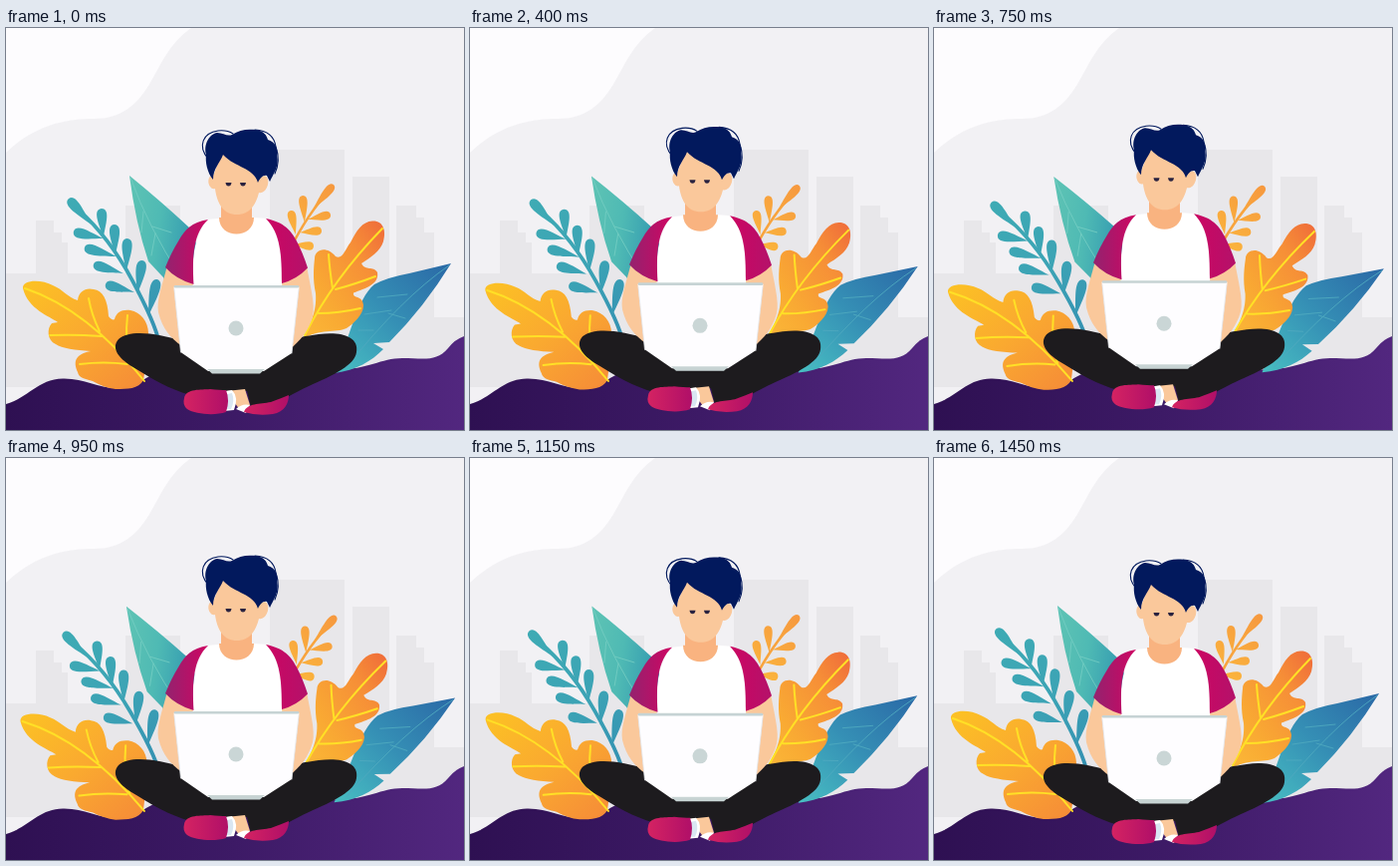
An HTML page that plays this animation: 460 px wide and 403 px high, repeating every 1500 ms.

```html
<!DOCTYPE html>
<html lang="en">
<head>
<meta charset="utf-8">
<title>Working outdoors</title>
<style>
  html, body { margin: 0; width: 100%; height: 100%; overflow: hidden; background: #f2f1f4; }
  svg { display: block; width: 100vw; height: 100vh; }
  .line { fill: none; stroke-linecap: round; }
</style>
</head>
<body>
<svg viewBox="0 0 460 403" preserveAspectRatio="none">
  <defs>
    <linearGradient id="hill">
      <stop offset="0" stop-color="#2e1052"/><stop offset=".5" stop-color="#3d1a66"/><stop offset="1" stop-color="#52277f"/>
    </linearGradient>
    <linearGradient id="gold" x1="0" y1="0" x2="1" y2="1">
      <stop offset="0" stop-color="#fcc224"/><stop offset=".5" stop-color="#faa930"/><stop offset="1" stop-color="#f58a38"/>
    </linearGradient>
    <linearGradient id="amber" x1="1" y1="0" x2="0" y2="1">
      <stop offset="0" stop-color="#ef6a3a"/><stop offset=".3" stop-color="#f68f37"/><stop offset=".7" stop-color="#f9aa33"/><stop offset="1" stop-color="#fbb838"/>
    </linearGradient>
    <linearGradient id="teal" x1="0" y1=".3" x2="1" y2=".6">
      <stop offset="0" stop-color="#5cc2b4"/><stop offset=".4" stop-color="#4fbab4"/><stop offset="1" stop-color="#2d93b0"/>
    </linearGradient>
    <linearGradient id="blue" x1="1" y1="0" x2="0" y2="1">
      <stop offset="0" stop-color="#2a68a6"/><stop offset=".5" stop-color="#358fb5"/><stop offset="1" stop-color="#48bfc2"/>
    </linearGradient>
    <linearGradient id="sprig" x1="60" y1="170" x2="155" y2="310" gradientUnits="userSpaceOnUse">
      <stop offset="0" stop-color="#3eabb4"/><stop offset=".55" stop-color="#3ca3b5"/><stop offset="1" stop-color="#3490b2"/>
    </linearGradient>
    <linearGradient id="twig" x1="328" y1="157" x2="284" y2="225" gradientUnits="userSpaceOnUse">
      <stop offset="0" stop-color="#f6993f"/><stop offset="1" stop-color="#fbb73c"/>
    </linearGradient>
    <linearGradient id="sleeveL">
      <stop offset="0" stop-color="#93236f"/><stop offset="1" stop-color="#cf0562"/>
    </linearGradient>
    <linearGradient id="sleeveR">
      <stop offset="0" stop-color="#cc0562"/><stop offset="1" stop-color="#b4126a"/>
    </linearGradient>
    <linearGradient id="shoe">
      <stop offset="0" stop-color="#d42362"/><stop offset="1" stop-color="#b00f68"/>
    </linearGradient>
  </defs>

  <rect width="460" height="403" fill="#f2f1f4"/>
  <path fill="#fdfcfe" d="M0 0H186C164 16 157 34 146 53C132 78 115 91 88 91C58 91 28 98 0 125Z"/>
  <path fill="#e8e7ea" d="M0 246H30V193H48V205H56V215H62V246H120V178H175V250H265V122H340V230H348V149H385V290H392V178H412V190H420V205H430V290H460V360H0Z"/>
  <path fill="url(#hill)" d="M0 377C22 371 32 352 57 351.500C80 351 92 362 115 361C135 360 140 346 165 342H320C362 345 374 331 398 331C420 331 432 335 444 321Q451 312 460 309V403H0Z"/>

  <g id="spear">
    <path fill="url(#teal)" d="M124 148Q156 174 184 200C205 235 190 290 172 290C163 273 163 260 158 250L143 234Q130 195 124 148Z"/>
    <path class="line" stroke="#77cfc4" stroke-width=".8" d="M125 150Q143 200 176 250M138 184L136 205M150 206L146 228M147 199L166 205"/>
  </g>
  <g id="sprigLeaves" fill="url(#sprig)">
    <path class="line" stroke="url(#sprig)" stroke-width="3.800" d="M73 182Q104 210 127 253T154 316"/>
  </g>
  <g id="twigLeaves" fill="url(#twig)">
    <path class="line" stroke="#f8a43e" stroke-width="2.600" d="M318 171Q300 191 280 232"/>
  </g>
  <g id="blade">
    <path fill="url(#blue)" d="M447 236L405 246Q383 250 370 257C352 272 345 312 330 346C352 343 367 334 379 322L369 316L385 315Q420 280 447 236Z"/>
    <path class="line" stroke="#4fa9bf" stroke-width=".9" d="M445 238Q397 271 342 340M403 267L373 270M387 283L360 287M384 286L401 291M369 303L354 303"/>
  </g>
  <g id="oakL">
    <path fill="url(#gold)" d="M17 261C16 252 36 252 47 258C57 262 62 270 72 273C73 264 80 260 88 262C97 263 102 272 103 289C105 292 108 293 109 292C111 285 116 282 125 283C135 285 143 294 143 306C141 325 141 337 138 353C133 362 122 362 110 362C102 361 94 358 87 354C80 352 73 351 72 345C67 334 70 327 85 324C70 323 56 321 50 317C41 313 41 301 46 296L52 295C44 289 22 282 17 261Z"/>
    <path class="line" stroke="#ffe026" stroke-width="2" d="M19 261Q82 282 139 354M83 271Q86 288 94 304M44 308Q70 307 96 309M122 288Q119 313 125 337M74 337Q98 334 122 337"/>
  </g>
  <g id="oakR">
    <path fill="url(#amber)" d="M298 312C309 291 312 280 311 266C308 252 309 240 310 231C310 222 322 218 331 229C338 233 341 221 346 215C352 203 358 194 368 193.500C379 193 382 203 379 214C376 224 366 230 357 236C361 244 369 238 373 245C375 257 361 261 349 265.500C348 272 358 267 359 278C359 288 348 297 342 301C331 306 315 301 298 312Z"/>
    <path class="line" stroke="#ffe026" stroke-width="2" d="M300 308Q329 251 378 201M328 261Q325 242 324 227M331 262Q350 257 371 249M314 286Q334 286 356 281"/>
  </g>

  <g id="person">
    <path fill="#1d1b1e" d="M178 314C152 306 124 302 113 312C105 321 113 332 131 342C153 356 174 366 190 369L222 364L242 364L246 380C272 378 287 367 302 360C331 347 350 338 352 325C355 309 336 304 314 307C300 309 292 310 285 314Z"/>
    <path fill="#fac89b" d="M221 364L240 362L245 378L235 383Z"/>
    <path fill="#fff" d="M220 364L227 363Q234 370 229 383L219 384ZM231 382Q237 376 245 378L241 386Z"/>
    <path fill="#d9e6f2" d="M222 367L227 366Q230 374 226 382L221 382Z"/>
    <path fill="url(#shoe)" d="M179 371C181 361 196 363 205 362Q215 363 221 363Q225 373 221 385C209 389 190 387 182 382Q177 378 179 371Z"/>
    <path fill="url(#shoe)" d="M239 385C242 376 255 377 266 375Q277 371 284 368C284 376 280 385 268 387Q252 389 239 385Z"/>

    <path fill="#fac89b" d="M162 238C157 258 151 272 153 285C157 301 165 311 177 319L190 250ZM302 238C305 257 311 277 308 289C304 304 295 314 285 322L273 250Z"/>
    <path fill="#fff" d="M203 192Q232 188 262 191C276 207 278 235 277 262H188C186 235 188 209 203 192Z"/>
    <path fill="url(#sleeveL)" d="M203 192C186 195 180 202 173.500 213Q166 225 160 240Q171 252 188.500 257C187 228 188 206 203 192Z"/>
    <path fill="url(#sleeveR)" d="M261 191C280 195 286 203 291.600 213Q298 225 303 240.500Q292 252 277 256C277 228 276 206 261 191Z"/>
    <path fill="#f9b380" d="M216 172H247V190H249C249 212 214 212 214 190H216Z"/>
    <path fill="#fac89b" d="M208 148C203 147 202 155 205 159Q207 162 210 161C212 177 219 187 232 187C245 187 251 177 254 165C262 167 267 151 260 148L253 150C246 132 222 120 216 128Z"/>
    <path fill="#2a2340" d="M220.500 155H226.500Q226 158.500 223.500 158.500T220.500 155ZM235 155H241Q240.500 158.500 238 158.500T235 155Z"/>
    <path fill="#02195d" d="M208 152C202 145 200 134 201 127C198 116 205 106 212 105C218 105 222 109 227 107C234 102 242 101 251 102C259 103 262 108 263 112C270 114 274 121 272 128C275 138 268 147 265 154L262 148C258 147 255 151 253 155C249 140 230 140 218 127C215 135 208 141 208 152Z"/>
    <path class="line" stroke="#02195d" stroke-width="1.100" d="M203 131C192 118 198 105 213 103Q222 102 228 106M250 102C266 103 270 112 271 119Q276 133 270 146"/>

    <path fill="#fefdff" d="M168.500 259.500H294.500L287 326L259 344H203L175.500 325Z"/>
    <path class="line" stroke="#e3e5ea" stroke-width=".8" d="M169 262L175.500 325M294 262L287 326"/>
    <path class="line" stroke="#c6d3d4" stroke-width="2.600" d="M170 259.300H293"/>
    <path fill="#c8d4d4" d="M202 342H260L255 346.500H207Z"/>
    <circle cx="231" cy="301" r="7.500" fill="#cad6d6"/>
  </g>
</svg>
<script>
  const byId = id => document.getElementById(id);

  // A teardrop that is broadest near its tip
  function addLeaflets(id, width, leaflets) {
    for (const [x, y, tipX, tipY] of leaflets) {
      const dx = tipX - x, dy = tipY - y, len = Math.hypot(dx, dy);
      const path = document.createElementNS('http://www.w3.org/2000/svg', 'path');
      const point = (along, side) => {
        const s = side * width / len;
        return `${x + dx * along - dy * s} ${y + dy * along + dx * s}`;
      };
      path.setAttribute('d', `M${point(0, 0)}C${point(.4, -.3)} ${point(.98, -1.1)} ${point(1, 0)}` +
        `C${point(.98, 1.1)} ${point(.4, .3)} ${point(0, 0)}Z`);
      byId(id).append(path);
    }
  }

  addLeaflets('sprigLeaves', 9, [
    [86, 197, 63, 171], [98, 211, 68, 204], [111, 229, 79, 220], [118, 246, 88, 237], [129, 265, 100, 257],
    [98, 210, 96, 181], [110, 228, 109, 197], [121, 244, 122, 211], [132, 267, 137, 233], [143, 289, 152, 252]
  ]);
  addLeaflets('twigLeaves', 7.5, [
    [308, 182, 329, 157], [300, 195, 298, 168], [291, 207, 286, 183],
    [303, 192, 326, 187], [295, 205, 317, 203], [289, 217, 309, 219]
  ]);

  // id, swing in degrees, pivot, delay in ms
  const swings = [
    ['spear', -1.4, 160, 300, 0],
    ['sprigLeaves', -2.3, 158, 312, 100],
    ['twigLeaves', 2.1, 285, 240, 0],
    ['blade', 2.9, 345, 335, 0],
    ['oakL', -1.8, 135, 358, 0],
    ['oakR', 2.1, 300, 310, 0]
  ];
  const LOOP = 1500, STEP = 50;
  const wave = t => (1 - Math.cos(2 * Math.PI * t / LOOP)) / 2;

  function draw() {
    const t = Math.floor(performance.now() % LOOP / STEP) * STEP;
    for (const [id, angle, x, y, delay] of swings)
      byId(id).setAttribute('transform', `rotate(${angle * wave(t - delay)} ${x} ${y})`);
    byId('person').setAttribute('transform', `translate(0 ${-4.8 * wave(t)})`);
    requestAnimationFrame(draw);
  }
  draw();
</script>
</body>
</html>
```
